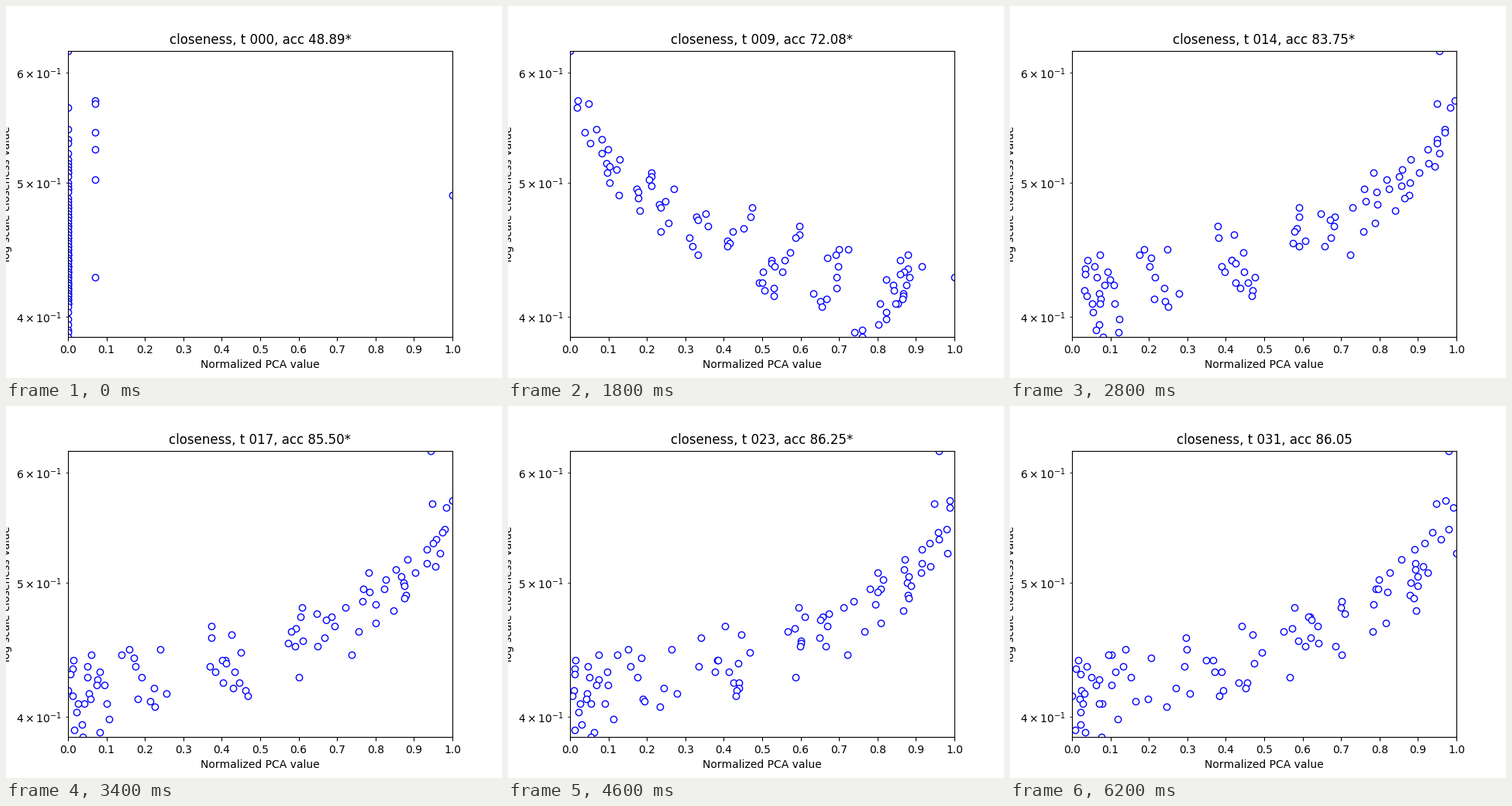
Write a matplotlib script that moves like this. It is 640 px wide and 480 px high and loops after 6.4 s.

```python
import numpy as np
import matplotlib.pyplot as plt
from matplotlib.animation import FuncAnimation

STEPS, INTERVAL = 32, 200
NODES = 95
FLIP = 12  # the sign of the principal axis turns over here

plt.rcParams["text.kerning_factor"] = 6
rng = np.random.default_rng(4)


def curve(x, *knots):
    """Piecewise linear curve through a few (x, y) knots."""
    return np.interp(x, *zip(*knots))


def jitter(scale):
    return scale * rng.uniform(-1.7, 1.7, NODES)


def normalize(x):
    return (x - x.min()) / np.ptp(x)


def mix(a, b, u):
    return a + (b - a) * u


# Whole-number path sums, so many nodes share a closeness value
distance = np.round(curve(
    np.arange(NODES), (0, 151), (1, 164), (3, 166), (4, 172), (11, 182),
    (24, 193), (30, 198), (47, 210), (69, 221), (84, 229), (88, 231),
    (91, 238), (94, 243)))
closeness = (NODES - 1) / distance


def make_columns():
    """Outer nodes bunch in columns of geometric spacing; inner ones stay loose."""
    trend = curve(distance, (151, 0), (164, .04), (180, .11), (188, .19),
                  (198, .33), (205, .42), (212, .57), (220, .64), (235, .79))
    noise = curve(distance, (151, 0), (170, .015), (190, .05), (212, .12),
                  (225, .12), (235, 0))
    rough = np.clip(trend + jitter(noise), .005, .8)
    band = np.round(np.log(rough / .79) / np.log(.82))
    x = np.where(rough > .2, .79 * .82 ** band, rough)
    return x * (1 + .001 * (220 - distance)) + jitter(.002)


def make_spread():
    x = curve(columns, (0, 0), (.2, .11), (.3, .22), (.79, .86))
    x += .004 * columns * (222 - distance)
    return x + jitter(.025 * np.sqrt(columns))


def make_ordered():
    x = curve(columns, (0, .98), (.2, .88), (.31, .77), (.435, .6),
              (.52, .46), (.635, .24), (.79, .08))
    return x + jitter(.03)


columns = make_columns()
spread = make_spread()
ordered = make_ordered()
settled = ordered + jitter(.02 + .1 * ordered * (1 - ordered))

outlier = np.searchsorted(distance, 220)
columns[outlier] = spread[outlier] = 1
columns, spread, ordered, settled = map(
    normalize, (columns, spread, ordered, settled))

start = np.zeros(NODES)
start[np.searchsorted(distance, [164, 165, 173, 178, 187, 220])] = .07
start[np.searchsorted(distance, 192)] = 1


def positions(t):
    if t == 0:
        return start
    if t <= 9:
        return mix(columns, spread, max(0, t - 5) / 4)
    if t <= 17:
        x = mix(1 - spread, ordered, 1 - (1 - (t - 9) / 8) ** 1.6)
        return x if t >= FLIP else 1 - x
    return mix(ordered, settled, (t - 17) / 14)


accuracy = curve(np.arange(STEPS), (0, 48.89), (5, 57.97), (9, 72.08),
                 (14, 83.75), (17, 85.50), (23, 86.25), (31, 86.05))

fig, ax = plt.subplots(figsize=(6.4, 4.8), dpi=100)
dots, = ax.plot(start, closeness, "o", color="blue", markerfacecolor="white")
ax.set_yscale("log")
ax.set_xlim(0, 1)
ax.set_ylim(closeness.min(), closeness.max())
ax.set_xticks(np.linspace(0, 1, 11))
ax.set_xlabel("Normalized PCA value")
ax.set_ylabel("log scale closeness value")
title = ax.set_title("")


def update(t):
    dots.set_xdata(positions(t))
    best = "*" if accuracy[t] >= accuracy[:t + 1].max() else ""
    title.set_text(f"closeness, t {t:03d}, acc {accuracy[t]:.2f}{best}")
    return dots, title


anim = FuncAnimation(fig, update, frames=STEPS, interval=INTERVAL, repeat=True)
plt.show()
```
